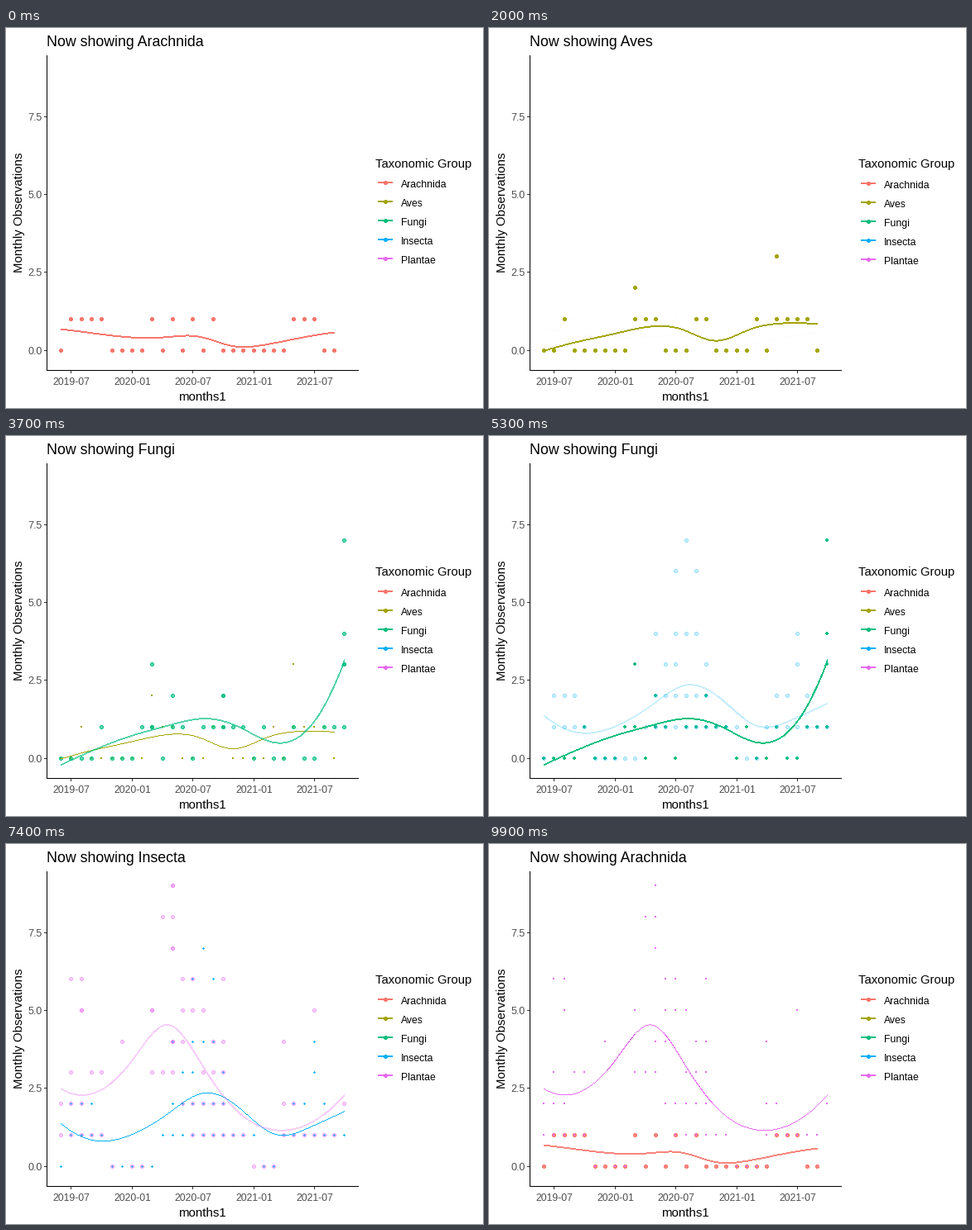
Animation, 576 px wide and 460 px high, one loop 10 s. Source, as a matplotlib script:

```python
import numpy as np
import matplotlib.pyplot as plt
from matplotlib.animation import FuncAnimation
from matplotlib.collections import PolyCollection
from matplotlib.patches import Rectangle

W, H, DPI = 576, 460, 80
PT = 72 / DPI                 # points per pixel
FRAMES, INTERVAL = 100, 100
PER_STATE, HOLD, STEPS = 20, 12, 9

plt.rcParams["font.family"] = "Liberation Sans"

# name, colour, number of months, months seen at 1, 2, 3... observations
# (all other months are at zero), evenly spaced knots of the trend
GROUPS = [
    ("Arachnida", "#F8766D", 28, ["1-4 9 11 13 15 23-25"],
     [.69, .55, .43, .43, .455, .15, .2, .415, .59]),
    ("Aves", "#A3A500", 28, ["2 9-11 15-16 21 23-26", "9", "23"],
     [0, .295, .535, .76, .69, .32, .68, .88, .85]),
    ("Fungi", "#00BF7D", 29,
     ["4 8-9 9 11-12 14-18 16 20 23 26-28", "11 16 16", "9 28 28", "28", "",
      "", "28"],
     [-.19, .32, .745, 1.06, 1.285, 1.02, .52, 1.01, 3.2]),
    ("Insecta", "#00B0F6", 29,
     ["1-4 10-19 22-28", "1-3 11-16 23-24 26", "12-13 16 25", "11 13-15 25",
      "", "13 15", "14"],
     [1.37, .83, 1.04, 1.7, 2.36, 1.9, 1.05, 1.26, 1.78]),
    ("Plantae", "#E76BF3", 29,
     ["0-4 13-18 22-27", "0-2 12-16 22-23 28", "1 3-4 9-11 14-16",
      "6 11 11-12 15-16 22", "2 2 9 9 12-14 25", "1-2 12-13 16", "11 11",
      "10-11", "11 11"],
     [2.49, 2.4, 3.42, 4.55, 3.2, 1.74, 1.18, 1.39, 2.31]),
]

START = np.datetime64("2019-06")
ORIGIN = np.datetime64("2019-07-01")


def month_x(i):
    day = (START + int(i)).astype("datetime64[D]")
    return 78.7 + 0.4013 * (day - ORIGIN).astype(int)


def value_y(v):
    return 390.15 - 37.73 * v


def months_in(runs):
    for run in runs.split():
        ends = [int(e) for e in run.split("-")]
        yield from range(ends[0], ends[-1] + 1)


def spread(count, levels):
    """Pixel centres of all points of one group."""
    pairs = [(m, v) for v, runs in enumerate(levels, 1)
             for m in months_in(runs)]
    seen = {m for m, _ in pairs}
    pairs += [(m, 0) for m in range(count) if m not in seen]
    return [(int(month_x(m)), int(value_y(v))) for m, v in pairs]


def spline(knots, t):
    """Cubic spline through even knots, parabolic at both ends; t in 0..1."""
    k = np.array(knots, float)
    n = len(k)
    a = 4 * np.eye(n) + np.eye(n, k=1) + np.eye(n, k=-1)
    a[0, 0] = a[-1, -1] = 1
    b = np.empty(n)
    b[1:-1] = 3 * (k[2:] - k[:-2])
    b[0], b[-1] = 2 * (k[1] - k[0]), 2 * (k[-1] - k[-2])
    m = np.linalg.solve(a, b)
    s = t * (n - 1)
    i = np.minimum(s.astype(int), n - 2)
    u = s - i
    return ((1 + 2 * u) * (1 - u) ** 2 * k[i] + u * (1 - u) ** 2 * m[i]
            + u * u * (3 - 2 * u) * k[i + 1] + u * u * (u - 1) * m[i + 1])


def quad(x, y, w, h):
    return [(x, y), (x + w, y), (x + w, y + h), (x, y + h)]


def stroke(x, y, width):
    """Crisp line made of one upright bar per pixel column."""
    h = np.round(width * np.hypot(1, np.gradient(y)))
    top = np.round(y + 0.5 - h / 2)
    return [quad(*bar_at, 1, tall) for *bar_at, tall in zip(x, top, h)]


def dot_parts(points, d):
    """Core and rim quads of round dots d pixels wide."""
    core, rim = [], []
    for cx, cy in points:
        x, y = cx - d // 2, cy - d // 2
        if d < 3:
            core.append(quad(x, y, d, d))
            continue
        n = d - 2
        core.append(quad(x + 1, y + 1, n, n))
        rim += [quad(x + 1, y, n, 1), quad(x + 1, y + d - 1, n, 1),
                quad(x, y + 1, 1, n), quad(x + d - 1, y + 1, 1, n)]
    return core, rim


fig = plt.figure(figsize=(W / DPI, H / DPI), dpi=DPI, facecolor="white")
ax = fig.add_axes([0, 0, 1, 1])
ax.set_xlim(0, W)
ax.set_ylim(H, 0)
ax.axis("off")


def label(x, y, text, px, color="black", ha="left", rotation=0):
    return ax.text(x, y, text, fontsize=px * PT, color=color, ha=ha,
                   va="baseline", rotation=rotation, rotation_mode="anchor")


def bar(x, y, w, h, color):
    return ax.add_patch(Rectangle((x, y), w, h, facecolor=color, linewidth=0,
                                  antialiased=False))


def quads(color, z):
    coll = PolyCollection([], facecolors=color, edgecolors="none",
                          linewidths=0, antialiaseds=False, zorder=z)
    return ax.add_collection(coll, autolim=False)


class Layer:
    """Points and trend line of one group."""

    def __init__(self, order, color, count, levels, knots):
        self.points = spread(count, levels)
        x0, x1 = month_x(0), month_x(count - 1)
        self.x = np.arange(int(x0), int(x1) + 1)
        t = np.clip((self.x - x0) / (x1 - x0), 0, 1)
        self.y = value_y(spline(knots, t))
        z = order / 10
        self.core, self.rim, self.line = self.parts = [
            quads(color, base + z) for base in (2, 2.05, 3)]

    def show(self, alpha, size, width):
        core, rim = dot_parts(self.points, size)
        self.core.set_verts(core)
        self.rim.set_verts(rim)
        self.line.set_verts(stroke(self.x, self.y, width))
        self.core.set_alpha(alpha)
        self.rim.set_alpha(1 - (1 - alpha) ** 2)   # fill and outline overlap
        self.line.set_alpha(alpha)
        self.set_visible(True)

    def set_visible(self, on):
        for part in self.parts:
            part.set_visible(on)


class Key:
    """One legend entry."""

    def __init__(self, row, name, color):
        self.y = 187 + 23 * row
        self.stroke = bar(449, self.y - 1, 18, 2, color)
        self.dot = quads(color, 2)
        self.text = label(477, self.y + 6, name, 12.2)

    def shift(self, dy):
        y = self.y + dy
        self.stroke.set_y(y - 1)
        core, rim = dot_parts([(458, y)], 5)
        self.dot.set_verts(core + rim)
        self.text.set_y(y + 6)


# Axes
bar(49, 33, 1, 382, "black")
bar(49, 414, 377, 1, "black")
for v in (0, 2.5, 5, 7.5):
    y = int(value_y(v))
    bar(46, y, 3, 1, "#333333")
    label(43.5, y + 5, f"{v:.1f}", 12.5, "#4D4D4D", "right")
for i in range(1, 26, 6):
    x = int(month_x(i))
    bar(x, 415, 1, 3, "#333333")
    label(x + 0.5, 432, str(START + i), 12.3, "#4D4D4D", "center")
label(237, 451, "months1", 15, ha="center")
label(20, 223, "Monthly Observations", 15, ha="center", rotation=90)
label(446, 169, "Taxonomic Group", 14.7)

title = label(49, 22, "", 17.8)
layers = [Layer(i, *g[1:]) for i, g in enumerate(GROUPS)]
keys = [Key(i, *g[:2]) for i, g in enumerate(GROUPS)]


def draw(frame):
    state, k = divmod(frame, PER_STATE)
    step = max(0, k - HOLD + 1)
    following = (state + 1) % len(GROUPS)

    title.set_text("Now showing " + GROUPS[following if step > 4 else state][0])
    for key in keys:
        key.shift(1 if frame else 0)

    for i, layer in enumerate(layers):
        if i == state:                       # shrinks on the way out
            layer.show(1, max(2, int(5.9 - 0.8 * step)), 2 if step < 3 else 1)
        elif i == following and step:        # fades in
            layer.show(step / STEPS, 5, 2)
        elif i == state - 1 and not step:    # faint trace of the last group
            layer.show(0.03, 2, 1)
        else:
            layer.set_visible(False)
    return []


anim = FuncAnimation(fig, draw, frames=FRAMES, init_func=lambda: draw(0),
                     interval=INTERVAL, repeat=True, repeat_delay=0, blit=False)
plt.show()
```
